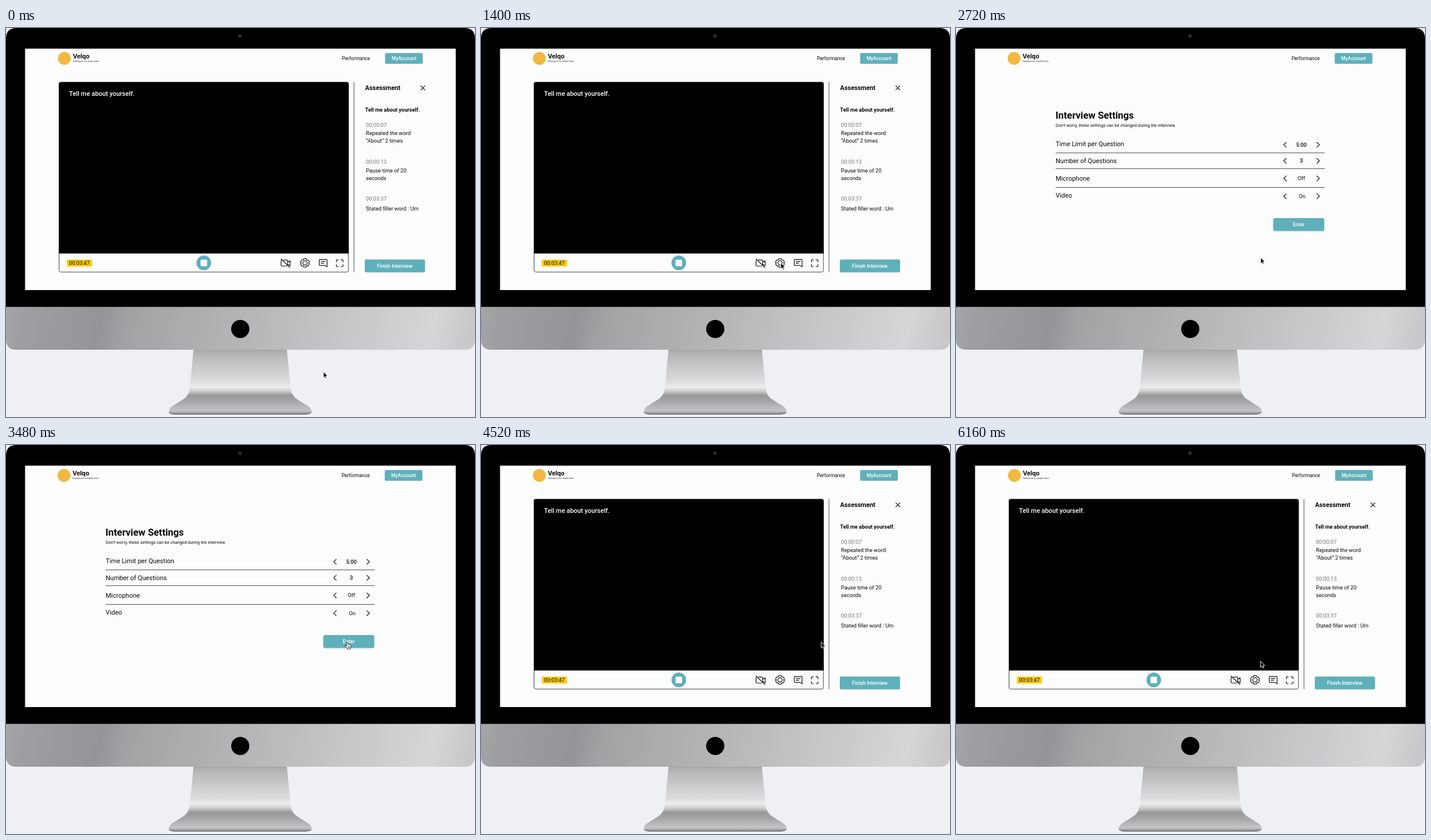
Write an HTML page that moves like this. It is 800 px wide and 665 px high and loops after 6200 ms.

```html
<!DOCTYPE html>
<html lang="en">
<head>
<meta charset="utf-8">
<title>Interview practice</title>
<style>
html, body { margin: 0; width: 100%; height: 100%; overflow: hidden; background: #eff0f4; }
svg { display: block; width: 800px; height: 665px; }
text { font: 400 9.18px Roboto, sans-serif; fill: #080808; }
.nav { font-size: 8.3px; }
.btn { font-size: 8.6px; font-weight: 500; fill: #fff; text-anchor: middle; }
.mid { text-anchor: middle; }
.medium { font-weight: 500; }
.bold { font-weight: 700; }
.time { fill: #757575; }
.row { font-size: 11px; }
.icon { fill: none; stroke: #111; stroke-width: 1.2; stroke-linecap: round; stroke-linejoin: round; }
.rule { stroke: #555; stroke-width: 1; }
.teal { fill: #5eb0ba; }

#call, #settings, #arrow, #hand { animation: 6200ms step-end infinite; }
#call { animation-name: call; }
#settings { animation-name: settings; }
#arrow { animation-name: arrow; }
#hand { animation-name: hand; }
#cursor { animation: travel 6200ms linear infinite; }

@keyframes call {
  0%, 72.88% { visibility: visible; }
  23.21% { visibility: hidden; }
}
@keyframes settings {
  0%, 72.88% { visibility: hidden; }
  23.21% { visibility: visible; }
}
@keyframes arrow {
  0%, 72.88% { visibility: visible; }
  50% { visibility: hidden; }
}
@keyframes hand {
  0%, 72.88% { visibility: hidden; }
  50% { visibility: visible; }
}
@keyframes travel {
  0% { transform: translate(541px, 587px); animation-timing-function: cubic-bezier(.4, 0, .6, 1); }
  10.3% { transform: translate(517px, 420px); animation-timing-function: ease-out; }
  18%, 42.6% { transform: translate(511px, 401px); }
  43.87% { transform: translate(519px, 392px); animation-timing-function: ease-out; }
  51.6%, 78% { transform: translate(580px, 336px); animation-timing-function: ease-in-out; }
  99.3%, 100% { transform: translate(519px, 369px); }
}
</style>
</head>
<body>
<svg viewBox="0 0 800 665">
  <defs>
    <linearGradient id="chin" x2="1" y2=".02">
      <stop offset="0" stop-color="#a4a6a8"/>
      <stop offset=".05" stop-color="#9c9ea1"/>
      <stop offset=".21" stop-color="#939598"/>
      <stop offset=".27" stop-color="#a2a3a5"/>
      <stop offset=".5" stop-color="#b4b4b6"/>
      <stop offset=".7" stop-color="#c4c4c6"/>
      <stop offset=".92" stop-color="#d6d5d7"/>
      <stop offset="1" stop-color="#c8c8ca"/>
    </linearGradient>
    <linearGradient id="metal" x2="0" y2="1">
      <stop offset="0" stop-color="#a4a4a6"/>
      <stop offset=".1" stop-color="#b8b8ba"/>
      <stop offset=".35" stop-color="#cfcfd1"/>
      <stop offset=".5" stop-color="#dcdcde"/>
      <stop offset=".58" stop-color="#ececed"/>
      <stop offset=".64" stop-color="#cfcfd1"/>
      <stop offset=".71" stop-color="#98989a"/>
      <stop offset=".8" stop-color="#a6a6a8"/>
      <stop offset=".94" stop-color="#c4c4c6"/>
      <stop offset="1" stop-color="#858587"/>
    </linearGradient>
    <filter id="glow" x="-10%" y="-30%" width="120%" height="170%">
      <feDropShadow dx="0" dy="1" stdDeviation="1.6" flood-color="#5eb0ba" flood-opacity=".45"/>
    </filter>
    <g id="nav">
      <circle cx="99.6" cy="52" r="11" fill="#f2b840"/>
      <text x="114" y="52" style="font: 700 10.2px Inter, sans-serif">Velqo</text>
      <text x="114" y="57.8" style="font: 400 2.75px Inter, sans-serif">Preparing you for a brighter future</text>
      <text class="nav" x="573" y="55">Performance</text>
      <rect class="teal" x="646.7" y="42.8" width="64.2" height="18.4" rx="2"/>
      <text class="btn" x="678.8" y="55" style="font-size: 8.3px">MyAccount</text>
    </g>
    <path id="steps" class="icon" d="M563.3-4.3 559-0 563.3 4.3M615.6-4.3 619.9 0 615.6 4.3"/>
  </defs>

  <!-- computer -->
  <path fill="url(#metal)" d="M320 548H479L485.5 616Q487 629 497 635L516 647Q521.5 651 521.5 657 520 661 505 661H294Q278 661 277.5 657 278 651 283 647L302 635Q312 629 313.5 616Z"/>
  <path d="M278 657Q280 659 296 659H503Q519 659 521.5 657 520 661 505 661H294Q279 661 278 657Z" fill="#7d7d80"/>
  <path d="M0 477V18Q0 0 18 0H782Q800 0 800 18V477Z"/>
  <path fill="url(#chin)" d="M0 476.7H800V532Q800 550 782 550H18Q0 550 0 532Z"/>
  <circle cx="399" cy="14" r="3" fill="#2b2b2d"/>
  <circle cx="399.6" cy="514.5" r="15.5"/>
  <rect x="32.5" y="35.3" width="734.7" height="412.7" fill="#fefdfe"/>

  <g id="call">
    <use href="#nav"/>
    <rect x="90.5" y="92.8" width="493.6" height="324.4" rx="3" fill="#fefdfe" stroke="#444"/>
    <path d="M90 385.6V95.5Q90 92.4 93 92.4H581.4Q584.5 92.4 584.5 95.5V385.6Z"/>
    <text class="medium" x="107.5" y="115.6" style="font-size: 10.95px; fill: #fff">Tell me about yourself.</text>
    <rect x="103.8" y="396" width="43" height="11.8" rx="1" fill="#fc0"/>
    <text class="mid" x="125.2" y="405">00:03:47</text>
    <circle class="teal" cx="337.4" cy="401.6" r="12.5"/>
    <rect x="331.8" y="396" width="11.2" height="11.2" rx="1.5" fill="#fff"/>

    <g class="icon">
      <path d="M469.3 395 484.3 409.5M473.3 396.7H478.6Q480.5 396.7 480.5 398.6V405M479 407H470.7Q469.2 407 469.2 405.5V398.2Q469.2 397 470.2 396.7M480.5 400.6 484.7 398V406.4L481.5 404.4"/>
      <path d="M508 394.4H512L513.2 396.5H515.6L517.5 399.9 516.4 401.6 517.5 403.3 515.6 406.7H513.2L512 408.8H508L506.8 406.7H504.4L502.5 403.3 503.6 401.6 502.5 399.9 504.4 396.5H506.8Z"/>
      <circle cx="510" cy="401.6" r="3.7"/>
      <path d="M535.6 395.6H546.4Q547.6 395.6 547.6 396.8V408.4L544.5 405.9H535.6Q534.4 405.9 534.4 404.7V396.8Q534.4 395.6 535.6 395.6ZM537.5 399.2H544.3M537.5 402.2H542"/>
      <path d="M563.5 399.8V397.6Q563.5 396.4 564.7 396.4H566.7M571.5 396.4H573.7Q574.9 396.4 574.9 397.6V399.8M574.9 404.6V406.8Q574.9 408 573.7 408H571.5M566.7 408H564.7Q563.5 408 563.5 406.8V404.6"/>
      <path d="M707.6 98.8 714.6 105.8M714.6 98.8 707.6 105.8"/>
    </g>

    <path class="rule" d="M593.6 92.4V417.5"/>
    <text class="bold" x="612.5" y="105.6" style="font-size: 10.8px">Assessment</text>
    <text class="bold" x="612.5" y="143" style="font-size: 9.05px">Tell me about yourself.</text>
    <text class="time" x="614" y="168.6">00:00:07</text>
    <text x="614" y="183.4">Repeated the word</text>
    <text x="614" y="196">“About” 2 times</text>
    <text class="time" x="614" y="231.6">00:00:13</text>
    <text x="614" y="247.3">Pause time of 20</text>
    <text x="614" y="259.9">seconds</text>
    <text class="time" x="614" y="294.6">00:03:37</text>
    <text x="614" y="311.6">Stated filler word : Um</text>
    <rect class="teal" x="612" y="395.8" width="102.8" height="22" rx="2.5"/>
    <text class="btn" x="663.2" y="409.8">Finish Interview</text>
  </g>

  <g id="settings">
    <use href="#nav" x="-.6"/>
    <text class="bold" x="169.8" y="154.8" style="font-size: 16.4px">Interview Settings</text>
    <text x="170" y="168.8" style="font-size: 7.3px">Don’t worry, these settings can be changed during the interview</text>
    <text class="row" x="170" y="202.3">Time Limit per Question</text>
    <text class="row" x="170" y="231.4">Number of Questions</text>
    <text class="row" x="170" y="260.8">Microphone</text>
    <text class="row" x="170" y="289.8">Video</text>
    <path class="rule" d="M170 213.5H629M170 240.5H629M170 272.5H629"/>
    <use href="#steps" y="199.6"/>
    <use href="#steps" y="227"/>
    <use href="#steps" y="257.2"/>
    <use href="#steps" y="287.6"/>
    <text class="mid medium" x="589.2" y="203">5:00</text>
    <text class="mid medium" x="589" y="230.2">3</text>
    <text class="mid" x="589" y="260.4">Off</text>
    <text class="mid" x="590.4" y="290.8">On</text>
    <rect class="teal" x="541.3" y="325" width="86.7" height="21.8" rx="2.5" filter="url(#glow)"/>
    <text class="btn" x="584.6" y="339">Enter</text>
  </g>

  <g id="cursor">
    <path id="arrow" d="M.4.6V11L2.8 8.8 4.3 12.3 6 11.6 4.5 8.1H7.6Z" stroke="#fff" stroke-width=".9" stroke-linejoin="round"/>
    <path id="hand" d="M.3 2.2C-.2.8 1.4.3 1.9 1.6L3.2 5C3.4 4 5 4 5.2 5.1 5.6 4.3 6.9 4.5 7 5.6 7.5 5 8.4 5.4 8.4 6.5V9.2Q8.4 10.5 7.6 11.4V12.7H2.4V11.7Q1 10.4-2 7.6C-2.8 6.6-1.6 5.7-.5 6.6L1.3 7.7ZM3.6 8.4V10.6M5.2 8.4V10.6M6.7 8.4V10.6" fill="#fff" stroke="#000" stroke-width=".8" stroke-linejoin="round"/>
  </g>
</svg>
</body>
</html>
```
